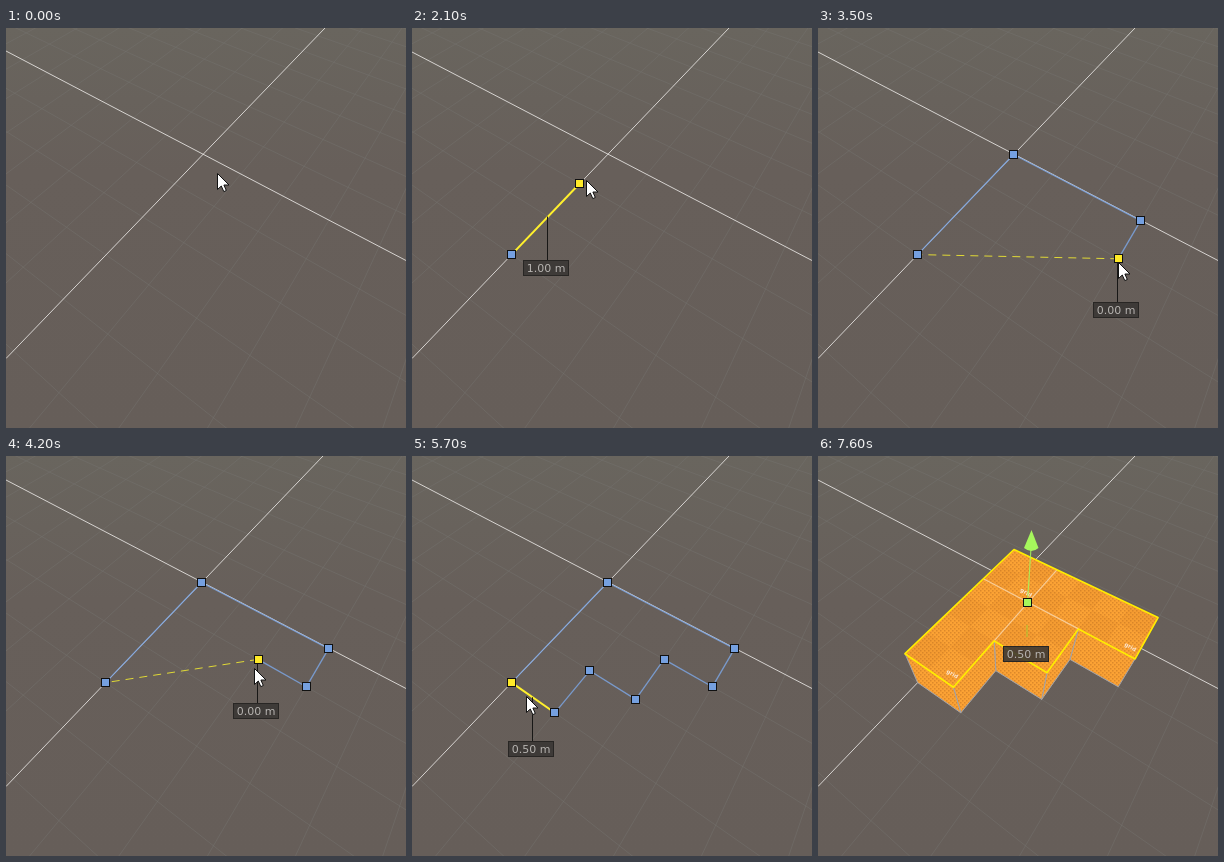
Animation of 400x400 px, one loop 8.3 s. Source, as an HTML page:

```html
<!DOCTYPE html>
<html lang="en">
<head>
<meta charset="utf-8">
<title>Extruding a drawn outline</title>
<style>
html, body { margin: 0; width: 100%; height: 100%; overflow: hidden; background: #675f5a; }
svg { display: block; width: 100vw; height: 100vh; }
text { font-family: "DejaVu Sans", sans-serif; }
</style>
</head>
<body>
<svg viewBox="0 0 400 400">
  <defs>
    <linearGradient id="sky" x2="0" y2="1">
      <stop offset="0" stop-color="#69655e"/>
      <stop offset=".36" stop-color="#675f5a"/>
      <stop offset="1" stop-color="#665e59"/>
    </linearGradient>
    <pattern id="dots" width="4" height="4" patternUnits="userSpaceOnUse">
      <rect width="4" height="4" fill="#fba234"/>
      <path d="M0 0h1.5v1.5h-1.5zM2 2h1.5v1.5h-1.5z" fill="#dc882a"/>
    </pattern>
  </defs>
  <rect width="400" height="400" fill="url(#sky)"/>
  <g id="grid" fill="none" stroke="#74736f" stroke-opacity=".5"></g>
  <g id="axes" stroke="#e9e7e4" stroke-opacity=".85"></g>
  <g id="scene"></g>
  <path id="cursor" d="M.5 .5V16.5L4.3 13L6.8 18.6L9.3 17.5L6.9 12H12Z" fill="#fff" stroke="#111"/>
</svg>
<script>
const LOOP = 8300, STEP = 100;
const $ = id => document.getElementById(id);

// Perspective maps from half-metre cells (u, v) to the stage.
const plane = (a, b, c, d, e, f, g, h) => ([u, v]) => {
  const w = 1 + g * u + h * v;
  return [(a * u + b * v + c) / w, (d * u + e * v + f) / w];
};
const ground = plane(29.5, -38.08, 195.5, 14.35, 19.46, 126.5, -.0399, -.0614);
const lid = plane(30.9, -42.72, 196, 14.57, 20.21, 93.5, -.0503, -.0734);

// A staircase outline; each corner is clicked in turn, then the first again.
const STEPS = 3;
const corners = [[0, STEPS], [0, 0], [STEPS, 0]];
for (let i = 1; i <= STEPS; i++) {
  corners.push([STEPS - i + 1, i]);
  if (i < STEPS) corners.push([STEPS - i, i]);
}
const corner = i => corners[i % corners.length];
const clicks = [1700, 2300, 3200, 3500, 4100, 4500, 5000, 5400, 5900];
const HOVER = 1000, GIZMO = 6000, GRAB = 6700, RAISE = 7000, RELEASE = 7500;

const ease = k => k * k * (3 - 2 * k);
const mix = (p, q, k) => p.map((n, i) => n + (q[i] - n) * k);
const clamp = k => Math.max(0, Math.min(1, k));

const pts = list => list.map(p => p.map(n => n.toFixed(1)).join(" ")).join(" ");
const line = (p, q, attrs = "") => `<path d="M${pts([p])}L${pts([q])}" fill="none" ${attrs}/>`;
const poly = (list, attrs) => `<polygon points="${pts(list)}" ${attrs}/>`;
const square = ([x, y], fill) =>
  `<rect x="${Math.round(x - .5) - 3.5}" y="${Math.round(y - .5) - 3.5}" width="8" height="8" fill="${fill}" stroke="#111"/>`;

function label([x, y], metres) {
  const cx = Math.round(x - 2), cy = Math.floor(y + 52);
  return `<rect x="${cx - 22.5}" y="${cy - 7.5}" width="45" height="15" fill="#393634" fill-opacity=".88" stroke="#282624"/>` +
    `<text x="${cx}" y="${cy + 4}" font-size="11" text-anchor="middle" fill="#b6b3b0">${metres.toFixed(2)} m</text>`;
}

function measure(p, q) {
  const mid = ground(mix(p, q, .5));
  const x = Math.round(mid[0] - 1) + .5;
  return line([x, mid[1]], [x, mid[1] + 44], 'stroke="#181716"') +
    label(mid, Math.hypot(q[0] - p[0], q[1] - p[1]) / 2);
}

// Where the hand is on the ground while drawing, before snapping.
function drag(t) {
  const placed = clicks.filter(c => c <= t).length;
  if (!placed || placed === clicks.length) return { placed, at: corner(0) };
  const k = (t - clicks[placed - 1]) / (clicks[placed] - clicks[placed - 1]);
  return { placed, at: mix(corner(placed - 1), corner(placed), ease(k)) };
}

// Free cursor moves: start, end, x, y.
const moves = [
  [0, 800, 100, 239], [900, 1400, 105, 228],
  [GIZMO, 6400, 208, 178], [6800, 7200, 209, 148], [7400, RELEASE, 228, 158]
];

function cursorAt(t) {
  if (t >= clicks[0] && t < GIZMO) {
    const [x, y] = ground(drag(t).at);
    return [x + 1, y + 4];
  }
  return moves.reduce((p, [from, to, x, y]) =>
    mix(p, [x, y], clamp((t - from) / (to - from))), [212, 146]);
}

const edge = (p, q, color) =>
  line(ground(p), ground(q), `stroke="${color}" stroke-width="1.3" stroke-opacity=".85"`);

function drawDraft(t) {
  const { placed, at } = drag(t);
  const active = at.map(Math.round);
  let out = "";
  for (let i = 1; i < placed; i++) out += edge(corner(i - 1), corner(i), "#7ba3de");
  if (placed) {
    const last = corner(placed - 1);
    if (placed > 1) out += line(ground(active), ground(corner(0)), 'stroke="#e0d936" stroke-dasharray="8 6"');
    out += line(ground(last), ground(active), 'stroke="#fff02c" stroke-width="2"') + measure(last, active);
  }
  for (const c of corners.slice(0, placed)) out += square(ground(c), "#75a0e0");
  return out + square(ground(active), "#ffea28");
}

function drawOutline(handles) {
  let out = corners.map((c, i) => edge(c, corner(i + 1), "#6d93c2")).join("");
  if (handles) for (const c of corners) out += square(ground(c), "#587496");
  return out;
}

function drawSolid() {
  let out = "";
  for (let i = STEPS; i < corners.length; i++) {
    const p = corner(i), q = corner(i + 1);
    out += poly([lid(p), lid(q), ground(q), ground(p)],
      'fill="url(#dots)" stroke="#a3a3a8" stroke-linejoin="round"');
  }
  out += poly(corners.map(lid), 'fill="url(#dots)"');
  for (let u = 0; u < STEPS; u += .5) for (let v = 0; v < STEPS; v += .5) {
    if (Math.floor(u) + Math.floor(v) < STEPS && (u + v) % 1)
      out += poly([[u, v], [u + .5, v], [u + .5, v + .5], [u, v + .5]].map(lid), 'fill="#b86a18" fill-opacity=".09"');
  }
  const seam = 'stroke="#f8cc96" stroke-width="1.2"';
  out += line(lid([0, 1]), lid([2, 1]), seam) + line(lid([1, 0]), lid([1, 2]), seam);
  for (const [u, v] of [[1, 1], [1, 3], [3, 1]]) {
    const [x, y] = lid([u - .15, v - .13]);
    out += `<text font-size="5.5" font-weight="bold" text-anchor="middle" fill="#fbe6d2" transform="translate(${x} ${y}) rotate(30)">grid</text>`;
  }
  return out + poly(corners.map(lid), 'fill="none" stroke="#ffec00" stroke-width="1.7" stroke-linejoin="round"');
}

function drawGizmo(raised, hot) {
  const [x, y] = raised ? [209.5, 146.5] : [208.5, 178.5];
  const [tipX, tipY] = raised ? [213.5, 74] : [211.5, 114];
  const base = tipY + 18;
  const color = hot ? "#93ff2e" : "#a6f65c";
  const stroke = `stroke="${color}" stroke-width="1.2" stroke-opacity=".85"`;
  let out = line([tipX - .5, base], [x, y], stroke);
  out += raised
    ? line([209, 169], [209, 181], 'stroke="#9bd832" stroke-opacity=".8"')
    : line([x, y], [206, 212], stroke) + `<circle cx="206" cy="212.5" r="5.5" fill="${color}"/>`;
  out += `<path d="M${tipX} ${tipY}L${tipX + 7} ${base}Q${tipX} ${base + 6} ${tipX - 7.5} ${base}Z" fill="${color}"/>`;
  return out + square([x, y], color);
}

function drawScene(t) {
  if (t < HOVER) return "";
  if (t < GIZMO) return drawDraft(t);
  const raised = t >= RAISE, grabbed = t >= GRAB;
  return (raised ? drawSolid() : drawOutline(!grabbed)) +
    drawGizmo(raised, t >= 6400 && t < RELEASE) +
    (grabbed ? label(raised ? [210, 146] : [209, 178], raised ? .5 : 0) : "");
}

function buildGrid() {
  let d = "";
  for (let i = -16; i <= 16; i++) {
    if (!i) continue;
    const u = Math.min(30, (.92 - .0614 * i) / .0399);
    const v = Math.min(30, (.92 - .0399 * i) / .0614);
    d += `M${pts([ground([-20, i])])}L${pts([ground([u, i])])}`;
    d += `M${pts([ground([i, -20])])}L${pts([ground([i, v])])}`;
  }
  $("grid").innerHTML = `<path d="${d}"/>`;
}

function render(t) {
  const shift = t < HOVER ? 2 : 0;
  $("axes").innerHTML = line([0, 24 - shift / 2], [400, 232.5]) + line([317 + shift, 0], [0, 330.5]);
  $("scene").innerHTML = drawScene(t);
  const [x, y] = cursorAt(t).map(Math.round);
  $("cursor").setAttribute("transform", `translate(${x - 1} ${y - 1})`);
  $("cursor").setAttribute("visibility", t <= RELEASE ? "visible" : "hidden");
}

const start = performance.now();
let shown = -1;
function loop() {
  const t = Math.floor((performance.now() - start) % LOOP / STEP) * STEP;
  if (t !== shown) render(shown = t);
  requestAnimationFrame(loop);
}
buildGrid();
loop();
</script>
</body>
</html>
```
